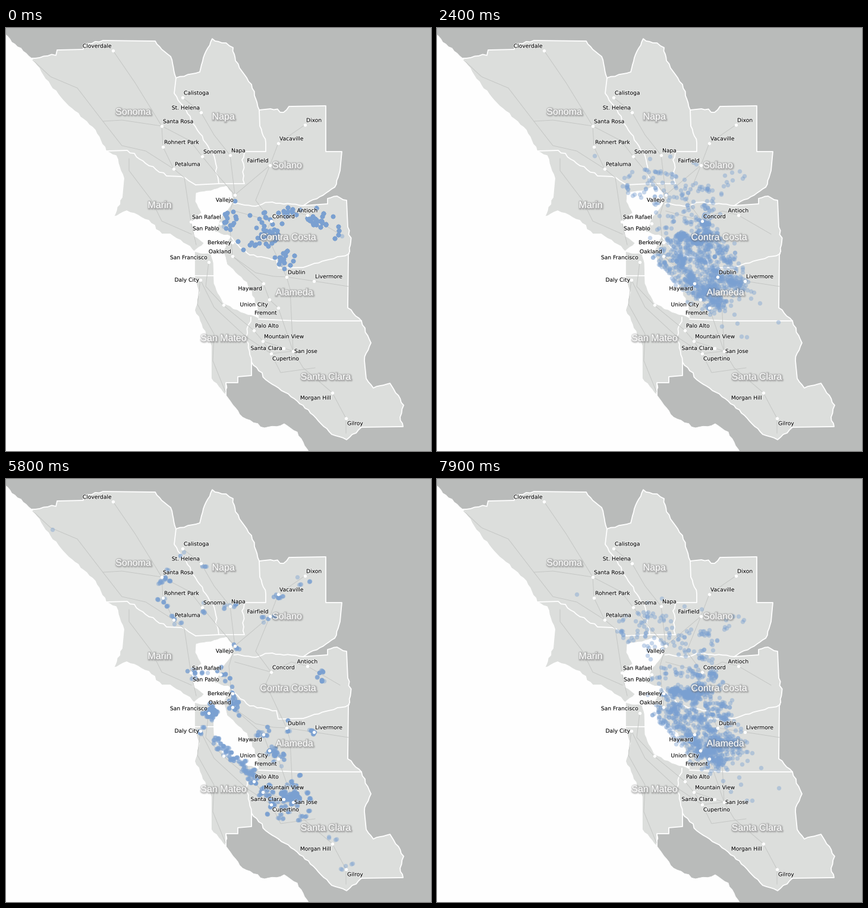
A matplotlib script for the animation above (8 s loop, 715x712 px).

```python
import numpy as np
import matplotlib.pyplot as plt
from matplotlib.animation import FuncAnimation
from matplotlib.patheffects import Normal, Stroke

W, H = 715, 712
PX = 0.72  # points per pixel at 100 dpi
LAND, COUNTY, WATER = "#b9bbba", "#dcdedc", "#fefefe"
ROAD, DOT = "#c3c5c3", "#7aa0d1"
STEPS, FRAMES, TURN = 50, 80, 107
MIN_TRIP, DECAY = 130, 120

rng = np.random.default_rng(4)
fig = plt.figure(figsize=(W / 100, H / 100), dpi=100, facecolor=LAND)
ax = fig.add_axes([0, 0, 1, 1])
ax.set_xlim(0, W)
ax.set_ylim(H, 0)
ax.axis("off")


def rough(points, size=0.9):
    """Roughen slanted edges; surveyed straight edges stay straight."""
    out = []
    for a, b in zip(points[:-1], points[1:]):
        d = b - a
        length = np.hypot(*d)
        n = int(length / 7) + 1
        line = a + np.linspace(0, 1, n, endpoint=False)[:, None] * d
        if np.abs(d).min() > 3:
            normal = np.array([-d[1], d[0]]) / length
            line[1:] += rng.normal(0, size, (n - 1, 1)) * normal
        out.append(line)
    return np.vstack(out + [points[-1:]])


def area(*v, fill, lw=1.8, z=1):
    p = np.reshape(v, (-1, 2)).astype(float)
    p = rough(np.vstack([p, p[:1]]))
    ax.add_patch(plt.Polygon(p, facecolor=fill, edgecolor="white",
                             linewidth=lw * PX, joinstyle="round", zorder=z))


def border(*v):
    x, y = rough(np.reshape(v, (-1, 2)).astype(float)).T
    ax.plot(x, y, color="white", lw=1.8 * PX, zorder=3)


# Name, marker x, y, side of the label, commuters arriving
cities = [
    ("Cloverdale", 180, 38, "NW", 0), ("Calistoga", 297, 117, "NE", 3),
    ("St. Helena", 328, 142, "NW", 6), ("Santa Rosa", 262, 165, "NE", 28),
    ("Rohnert Park", 264, 200, "NE", 18), ("Sonoma", 330, 216, "NE", 8),
    ("Napa", 377, 214, "NE", 16), ("Petaluma", 282, 237, "NE", 12),
    ("Dixon", 503, 163, "NE", 8), ("Vacaville", 458, 194, "NE", 18),
    ("Fairfield", 444, 231, "NW", 14), ("Vallejo", 385, 281, "SW", 12),
    ("Antioch", 507, 315, "N", 0), ("Concord", 446, 325, "NE", 0),
    ("San Rafael", 311, 326, "NE", 26), ("San Pablo", 361, 329, "SW", 30),
    ("Berkeley", 381, 361, "W", 14), ("Oakland", 381, 384, "NW", 75),
    ("San Francisco", 341, 394, "NW", 230), ("Daly City", 327, 424, "W", 18),
    ("Dublin", 472, 419, "NE", 14), ("Livermore", 518, 426, "NE", 22),
    ("Hayward", 433, 430, "SW", 28), ("Union City", 443, 457, "SW", 26),
    ("Fremont", 458, 471, "SW", 48), ("Palo Alto", 417, 509, "NE", 45),
    ("Mountain View", 432, 527, "NE", 50), ("Santa Clara", 467, 539, "W", 90),
    ("San Jose", 483, 544, "E", 110), ("Cupertino", 446, 548, "SE", 32),
    ("Morgan Hill", 549, 614, "SW", 4), ("Gilroy", 572, 657, "SE", 3)]
place = {name: (x, y) for name, x, y, *_ in cities}


def road(*stops):
    x, y = zip(*(place.get(s, s) for s in stops))
    ax.plot(x, y, color=ROAD, lw=0.9 * PX, zorder=4)


# Ocean and the land of all counties
area(-2, 10, 15, 27, 43, 51, 300, 200, 345, 300, 375, 520, 370, 618, 398, 655,
     435, 673, 468, 666, 490, 680, 510, 714, -2, 714, fill=WATER, lw=0.8)
north = [43, 51, 84, 46, 86, 37, 130, 36, 131, 28, 163, 21, 251, 22, 262, 36,
         277, 48, 286, 84, 326, 74, 332, 50, 347, 18, 363, 25, 382, 33,
         386, 55, 413, 95, 426, 138, 445, 136, 467, 142, 476, 132, 538, 131]
east = [538, 208, 565, 208, 562, 240, 553, 268, 528, 284, 500, 299, 541, 296,
        541, 287, 557, 283, 573, 290, 575, 335, 580, 360, 576, 381, 575, 471,
        598, 493, 614, 530, 603, 560, 606, 590, 618, 606, 646, 598, 669, 635,
        663, 655, 668, 671, 598, 672, 573, 693]
south = [548, 684, 512, 648, 490, 628, 437, 592, 413, 562, 413, 585, 390, 587,
         390, 597, 370, 597, 370, 618, 345, 590, 345, 535, 317, 475, 325, 445,
         317, 420, 317, 377]
coast = [298, 362, 276, 347, 262, 347, 240, 324, 203, 308, 181, 318, 195, 285,
         198, 253, 185, 215, 168, 207, 150, 172, 96, 122, 66, 86]
area(*north, *east, *south, *coast, fill=COUNTY, z=2)

# County borders
border(286, 84, 283, 110, 299, 132, 322, 172, 350, 215, 358, 262)
border(168, 207, 204, 206, 235, 228, 270, 249, 295, 250, 319, 264)
border(319, 264, 358, 262, 400, 262)
border(426, 138, 427, 165, 437, 193, 437, 208, 402, 208, 397, 222, 401, 262)
border(384, 296, 420, 300, 448, 293, 500, 299)
border(378, 351, 385, 360, 410, 382, 455, 390, 458, 404, 500, 403, 577, 380)
border(425, 490, 490, 493, 598, 493)
border(412, 487, 404, 520, 413, 562)
border(317, 417, 353, 417)

# Bay
area(320, 278, 345, 274, 372, 266, 383, 290, 362, 318, 351, 343, 378, 351,
     366, 374, 372, 398, 405, 428, 418, 455, 425, 488, 395, 478, 365, 462,
     350, 430, 349, 395, 345, 381, 316, 376, 333, 362, 316, 350, 312, 328,
     329, 311, 319, 292, fill=WATER, lw=0.8, z=3)

# Roads
road("Cloverdale", (217, 92), "Santa Rosa", "Rohnert Park", "Petaluma",
     (300, 252), "San Rafael", (320, 365))
road("San Francisco", (336, 435), (366, 467), "Palo Alto", "Mountain View",
     "San Jose", (500, 572), "Morgan Hill", "Gilroy", (572, 682))
road((45, 54), (75, 82), (120, 101), (163, 157), (195, 155), "Santa Rosa")
road((163, 157), (195, 198), (235, 207), "Petaluma")
road((207, 220), (207, 240), (245, 290), (262, 325), (312, 347))
road("Calistoga", "St. Helena", (350, 180), "Napa", "Vallejo")
road("Santa Rosa", (310, 190), "Sonoma", (358, 250), "Vallejo")
road("Dixon", "Vacaville", "Fairfield", "Vallejo", (375, 315), "Oakland",
     "Hayward", "Union City", "Fremont", "San Jose")
road("Fairfield", (420, 290), "Concord", (437, 345), "Dublin", (478, 440),
     "San Jose")
road((385, 308), "Concord", (480, 308), "Antioch", (562, 347))
road("Oakland", (420, 412), (450, 418), "Dublin", "Livermore", (576, 435))
road("Daly City", (350, 470), (404, 520), "Cupertino", "San Jose")
road("Daly City", (322, 465), (350, 515), (348, 560), (369, 612))
road("Mountain View", "Cupertino", (462, 580), (520, 572))

# Clusters as x, y, spread x, spread y, count
home_areas = [
    (374, 328, 9, 13, 18), (432, 320, 9, 6, 9), (446, 341, 11, 10, 22),
    (417, 362, 7, 7, 8), (472, 388, 8, 11, 15), (478, 310, 10, 4, 12),
    (522, 324, 11, 7, 24), (558, 345, 4, 7, 4)]
work_areas = [(x, y, 6, 6, n) for _, x, y, _, n in cities if n]
work_areas += [(480, 535, 15, 15, 110), (475, 572, 20, 5, 40),
               (533, 333, 7, 9, 34)]
# Offices along the bay shore
work_areas += [(350 + 60 * t, 442 + 58 * t, 4, 4, 18)
               for t in np.linspace(0, 1, 8)]
# Longest single trips: home x, y, work x, y
lone = [(445, 340, 70, 80), (565, 350, 583, 653), (463, 398, 583, 653)]

homes = np.vstack([rng.normal(a[:2], a[2:4], (a[4], 2)) for a in home_areas])


def make_trips():
    trips = list(lone)
    for x, y, sx, sy, count in work_areas:
        sites = count // 5 + 2
        spots = rng.normal((x, y), (sx, sy), (sites, 2))
        for spot in spots[rng.integers(sites, size=count)]:
            d = np.hypot(*(homes - spot).T)
            p = np.where(d > MIN_TRIP, np.exp(-d / DECAY), 0)
            home = homes[rng.choice(len(homes), p=p / p.sum())]
            trips.append((*home, *spot))
    trips = rng.permutation(np.array(trips))
    return trips[:, :2], trips[:, 2:]


start, end = make_trips()
dots, = ax.plot([], [], "o", ms=7.4 * PX, mfc=DOT, mec="none", alpha=0.42,
                zorder=5)


def glow(color, *layers, offset=(0, 0)):
    return [Stroke(offset=offset, linewidth=w * PX, foreground=color, alpha=a)
            for w, a in layers] + [Normal()]


shadow = glow("#606060", (6.5, 0.08), (4.5, 0.12), (2.5, 0.22),
              offset=(0.6, -0.6))
halo = glow("white", (2.2, 0.5))


def label(x, y, text, family, size, **style):
    ax.text(x, y, text, family=family, size=size * PX, va="baseline", **style)


def marker(x, y):
    ax.plot(x, y, "o", ms=5.4 * PX, mfc="white", mec="none", zorder=6)


for name, x, y in [
        ("Sonoma", 214, 146), ("Napa", 365.5, 154), ("Solano", 473, 236),
        ("Marin", 258.5, 303), ("Contra Costa", 474.5, 357),
        ("Alameda", 485, 450), ("San Mateo", 366, 527),
        ("Santa Clara", 538, 592)]:
    label(x, y, name, "Liberation Sans", 16, color="white", ha="center",
          path_effects=shadow, zorder=7)

ALIGN = {"E": ("left", 2), "W": ("right", -2)}
DROP = {"N": -4.7, "S": 11.5}
for name, x, y, side, _ in cities:
    marker(x, y)
    ha, dx = ALIGN.get(side[-1], ("center", 0))
    label(x + dx, y + DROP.get(side[0], 3), name, "DejaVu Sans", 9.15,
          color="black", ha=ha, path_effects=halo, zorder=8)
marker(366, 466)


def draw(i):
    # Travel out, wait, then head back
    t = min(i, STEPS, TURN - i) / STEPS
    x, y = (start + (end - start) * t).T
    dots.set_data(x, y)
    return dots,


anim = FuncAnimation(fig, draw, frames=FRAMES, interval=100, repeat=True,
                     repeat_delay=0)
plt.show()
```
